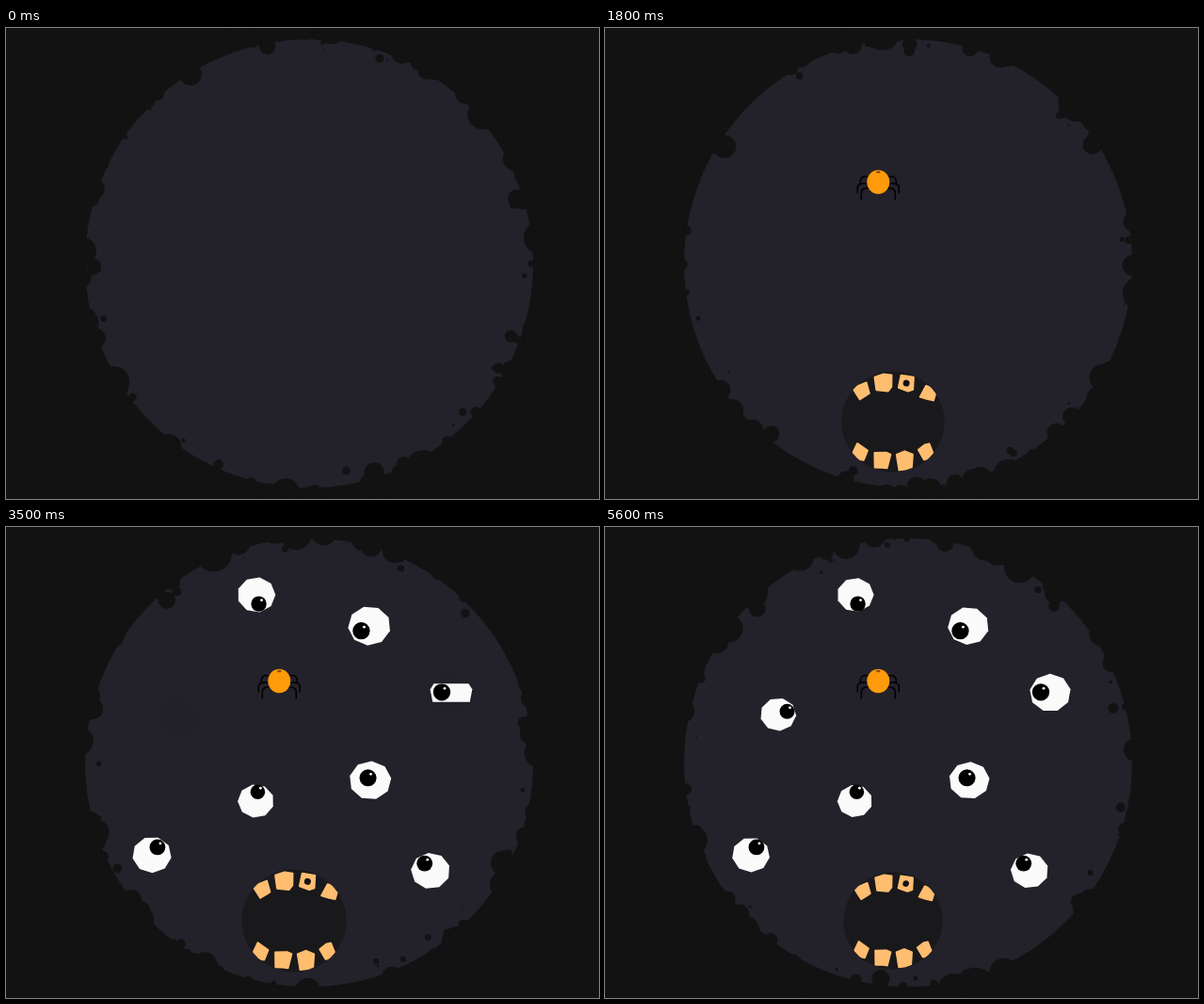
Recreate the animation shown at these times as an HTML page with a canvas. Size 630 px wide and 500 px high, loop 5.7 s.

```html
<!DOCTYPE html>
<html>
<head>
<meta charset="utf-8">
<style>
html, body { margin: 0; width: 100%; height: 100%; overflow: hidden; background: #121213; }
canvas { display: block; }
</style>
</head>
<body>
<canvas id="stage" width="630" height="500"></canvas>
<script>
const c = document.getElementById('stage').getContext('2d');
const LOOP = 5700, STEP = 100, TAU = Math.PI * 2;
const NIGHT = '#121213', BODY = '#23212a', SOCKET = '#222028', THROAT = '#19181b';
const HEAD = { x: 322, y: 250, r: 238 };
const SPIDER = { x: 290.3, y: 163.5 };
const MOUTH = { x: 306, y: 418, rx: 54, ry: 53 };

const clamp = v => Math.max(0, Math.min(1, v));
const ramp = (t, from, length) => clamp((t - from) / length);

let seed = 7;
const random = () => (seed = seed * 16807 % 2147483647) / 2147483647;
const between = (a, b) => a + (b - a) * random();

// Bites eat the rim: each drifts inwards while it shrinks, until its end.
const bites = Array.from({ length: 430 }, () => ({
  angle: between(0, TAU),
  dist: 215 + 23 * Math.sqrt(random()),
  end: between(0, 82),
  life: between(17, 27)
}));

// All eyes look at the spider; gaze is how far the pupil leaves the middle.
const eyes = [
  { x: 266, y: 72, r: 20 },
  { x: 386, y: 105, r: 22.3 },
  { x: 473, y: 176, r: 22.3, blink: 3410 },
  { x: 184, y: 199, r: 19.5, blink: 3500 },
  { x: 265.5, y: 291, r: 19 },
  { x: 387, y: 269, r: 22, gaze: 3.6 },
  { x: 155, y: 348, r: 20.5 },
  { x: 451, y: 365, r: 20.5 }
];

// Two rows of four uneven teeth along the lips.
const OUTLINE = [[-8, -8], [0, -9], [8, -8], [9, 7], [2, 9], [-8, 8]];
const teeth = [];
for (const side of [-1, 1]) {
  for (let i = 0; i < 4; i++) {
    const x = -34 + 23.5 * i - side, size = 1 - Math.abs(x) / 170;
    teeth.push({
      x, y: side * 42 * Math.sqrt(1 - (x / 53) ** 2),
      tilt: -side * x * 0.013,
      hole: side < 0 && i === 2,
      points: OUTLINE.map(([px, py]) => [px * size + between(-1.5, 1.5), -side * py * size + between(-1.5, 1.5)])
    });
  }
}

const legs = new Path2D('M-10 -5Q-17 -8 -19 -2V2M-10 2Q-22 0 -22 6V12M-8 7Q-18 5 -18 12V19');

function oval(x, y, rx, ry, color) {
  c.beginPath();
  c.ellipse(x, y, rx, ry, 0, 0, TAU);
  c.fillStyle = color;
  c.fill();
}
const dot = (x, y, r, color) => oval(x, y, r, r, color);

function polygon(points, color) {
  c.beginPath();
  for (const p of points) c.lineTo(...p);
  c.closePath();
  c.fillStyle = color;
  c.fill();
}

function drawMouth(t, pulse) {
  const open = ramp(t, 630, 700);
  if (!open) return;
  c.save();
  c.translate(MOUTH.x, MOUTH.y);
  c.scale(pulse, pulse);
  oval(0, 0, MOUTH.rx, MOUTH.ry * open, THROAT);
  c.clip();
  c.strokeStyle = '#ffbd70';
  c.lineJoin = 'round';
  c.lineWidth = 2;
  for (const tooth of teeth) {
    c.save();
    c.translate(tooth.x, tooth.y * open);
    c.rotate(tooth.tilt);
    polygon(tooth.points, '#ffbd70');
    c.stroke();
    if (tooth.hole) dot(0, 0, 3.4, NIGHT);
    c.restore();
  }
  c.restore();
}

function drawSpider(t) {
  const size = ramp(t, 600, 270), reach = ramp(t, 900, 300);
  if (!size) return;
  c.save();
  c.translate(SPIDER.x, SPIDER.y);
  c.strokeStyle = '#000';
  c.lineWidth = 1.5;
  if (reach) for (const side of [-1, 1]) {
    c.save();
    c.scale(side * reach, reach);
    c.stroke(legs);
    c.restore();
  }
  oval(0, 0, 12 * size, 12.7 * size, '#ff9a0a');
  if (size === 1) oval(0, -10.5, 2.4, 1.2, '#8a5408');
  c.restore();
}

function drawEye({ x, y, r, gaze = 10, blink }, i, t, pulse) {
  let open = ramp(t, 2690 - 0.7 * y, 400);
  if (!open) return;
  if (blink) open = Math.min(open, Math.abs(t - blink) / 210);
  const ry = r * 0.92, half = (ry + 2) * open;
  if (open < 1) oval(x, y + 2, r, ry, SOCKET);
  c.save();
  c.beginPath();
  c.rect(x - 30, y - half, 60, half * 2);
  c.clip();
  const corners = Array.from({ length: 9 }, (_, k) => {
    const a = (k + i * 0.37) * TAU / 9;
    return [x + Math.cos(a) * r * pulse, y + Math.sin(a) * ry * pulse];
  });
  polygon(corners, '#fafafa');
  const look = Math.atan2(SPIDER.y - y, SPIDER.x - x);
  const px = x + Math.cos(look) * gaze, py = y + Math.sin(look) * gaze;
  dot(px, py, r * 0.41, '#000');
  dot(px + 3, py - 4, 1.4, '#fff');
  c.restore();
}

function drawBites(step) {
  for (const { angle, dist, end, life } of bites) {
    const left = end - step;
    if (left <= 0 || left >= life) continue;
    const d = dist + left * 1.05;
    const r = left * 0.85 * Math.min(1, (life - left) / 3);
    dot(HEAD.x + Math.cos(angle) * d, HEAD.y + Math.sin(angle) * d, r, NIGHT);
  }
}

function draw(t) {
  const breath = 0.02 * Math.cos((t - 3000) / 1000);
  c.fillStyle = NIGHT;
  c.fillRect(0, 0, 630, 500);
  dot(HEAD.x, HEAD.y, HEAD.r, BODY);
  drawMouth(t, 1 + breath * 1.6);
  drawBites(t / STEP);
  drawSpider(t);
  eyes.forEach((eye, i) => drawEye(eye, i, t, 1 + breath));
}

function tick() {
  draw(Math.floor(performance.now() % LOOP / STEP) * STEP);
  requestAnimationFrame(tick);
}
tick();
</script>
</body>
</html>
```
